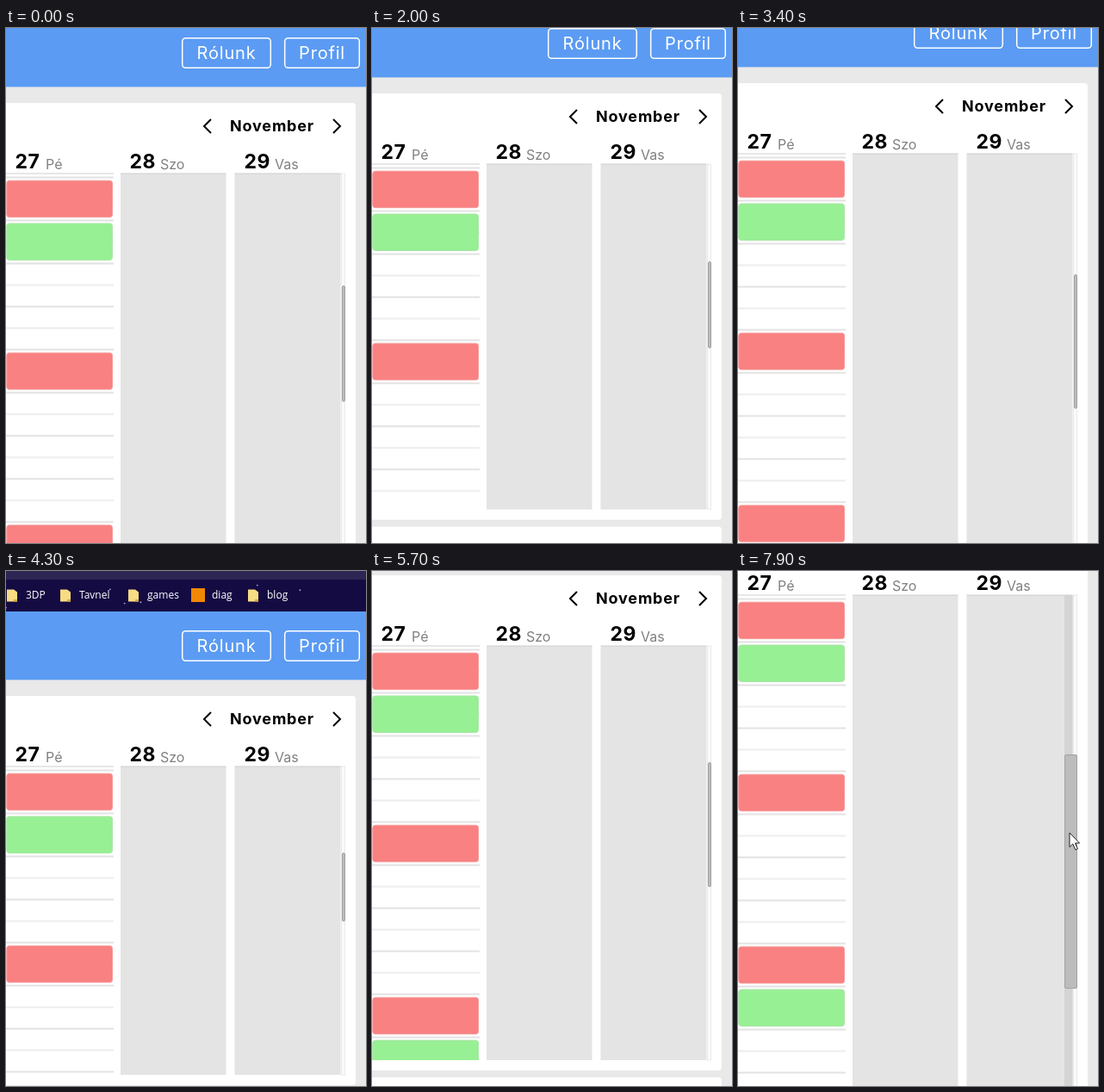
Write an HTML page that moves like this. It is 418x598 px and loops after 8000 ms.

```html
<!DOCTYPE html>
<html lang="hu">
<head>
<meta charset="utf-8">
<style>
  html, body { margin: 0; width: 100%; height: 100%; overflow: hidden; background: #e9e9e9; }
  svg { display: block; width: 418px; height: 598px; }
  text { font-family: Inter, sans-serif; }
  .button rect { fill: none; stroke: #fff; stroke-width: 1.5; }
  .button text { fill: #fff; font-size: 20px; letter-spacing: .8px; text-anchor: middle; }
  .month { font-size: 18px; font-weight: 700; letter-spacing: .8px; text-anchor: middle; }
  .arrow { fill: none; stroke: #000; stroke-width: 2; }
  .num { font-size: 23px; font-weight: 700; letter-spacing: .5px; }
  .day { font-size: 16px; fill: #808080; }
  .mark { font: 12px "Open Sans", sans-serif; fill: #fff; }
  .busy { fill: #f98181; stroke: #f79a9a; }
  .free { fill: #98f095; stroke: #a9e6a6; }
</style>
</head>
<body>
<svg viewBox="0 0 418 598">
  <defs>
    <clipPath id="clip"><rect class="fit" y="0" width="418"/></clipPath>
    <pattern id="rows" y="3.5" width="125" height="50" patternUnits="userSpaceOnUse">
      <rect width="125" height="2" fill="#e2e2e2"/>
      <rect y="25" width="125" height="2" fill="#ededed"/>
    </pattern>
  </defs>
  <rect width="418" height="598" fill="#e9e9e9"/>
  <!-- y = 0 is the top edge of the calendar grid -->
  <g id="page">
    <rect y="-330" width="418" height="80" fill="#160c3f"/>
    <rect y="-250" width="418" height="1" fill="#504a70"/>
    <rect y="-249" width="418" height="32" fill="#2d2554"/>
    <rect y="-217" width="418" height="37" fill="#150b43"/>
    <g id="stars" fill="#a9a2e0"></g>
    <g id="marks"></g>
    <rect y="-180" width="418" height="79.4" fill="#5b9bf3"/>
    <g class="button">
      <rect x="204.7" y="-157.3" width="102.6" height="34.6" rx="4"/>
      <text x="256" y="-133">Rólunk</text>
      <rect x="323.7" y="-157.3" width="86.6" height="34.6" rx="4"/>
      <text x="367" y="-133">Profil</text>
    </g>
    <rect id="card" x="-10" y="-82" width="416" rx="4" fill="#fff"/>
    <rect id="next" x="-10" width="416" height="600" rx="4" fill="#fff"/>
    <path class="arrow" d="M238-63l-8 8 8 8M380-63l8 8-8 8"/>
    <text class="month" x="309" y="-49">November</text>
    <g id="days"></g>
    <g clip-path="url(#clip)">
      <rect width="125" height="900" fill="url(#rows)"/>
      <g id="events"></g>
      <path d="M133 0h122.500v900h-122.500zM265.500 0h123v900h-123z" fill="#e4e4e4"/>
    </g>
    <path d="M0 0h125M133 0h122.500M265.500 0h123" stroke="#cfcfcf"/>
    <rect class="fit" x="389.500" width="4" fill="#fafafa" stroke="#e9e9e9"/>
    <rect id="track" class="fit" x="379" width="9.500" fill="#d4d4d4"/>
    <rect id="thumb" rx="1.500" fill="#bcbcbc" stroke="#a2a2a2"/>
    <path d="M401-303v20M397.500-299l3.500-4 3.500 4M397.500-286l3.500 4 3.500-4" fill="none" stroke="#fff" stroke-width="1.600"/>
  </g>
  <path id="pointer" d="M0 0v16.500l3.800-3.600 3 6.800 2.600-1.200-3-6.500h5.200z" fill="#fff" stroke="#222"/>
</svg>
<script>
  const $ = id => document.getElementById(id);
  const set = (el, attrs) => { for (const k in attrs) el.setAttribute(k, attrs[k]); };
  const fits = document.querySelectorAll('.fit');

  let seed = 7;
  const random = () => (seed = seed * 16807 % 2147483647) / 2147483647;
  for (let i = 0; i < 10; i++)
    $('stars').innerHTML += `<circle cx="${random() * 418}" cy="${-212 + random() * 30}" r=".9"/>`;

  const folder = x => `<path d="M${x}-205.500h8l4 3v11h-12z" fill="#f8dc83"/>
    <path d="M${x + 8}-194h4v2.500h-4z" fill="#d9a93c"/>`;
  const app = x => `<rect x="${x}" y="-207" width="16" height="16" fill="#f08705"/>`;
  const mark = (name, x, icon = folder) =>
    $('marks').innerHTML += icon(x - (icon === app ? 24 : 22)) + `<text class="mark" x="${x}" y="-195">${name}</text>`;
  mark('3DP', 23);
  mark('Tavnel', 85);
  mark('games', 164);
  mark('diag', 239, app);
  mark('blog', 303);

  ['Pé', 'Szo', 'Vas'].forEach((day, i) => {
    const x = 10.5 + 133 * i;
    $('days').innerHTML += `<text class="num" x="${x}" y="-6">${27 + i}</text>
      <text class="day" x="${x + 35.5}" y="-5">${day}</text>`;
  });

  const event = (kind, y) =>
    $('events').innerHTML += `<rect class="${kind}" x=".8" y="${y}" width="122.700" height="42.500" rx="3"/>`;
  for (let i = 0; i < 3; i++) {
    event('busy', 8.2 + 200 * i);
    if (i % 2 === 0) event('free', 58 + 200 * i);
  }

  // The dragged window edge moves the grid top: turning points as [time, y].
  const drag = [[-100, 157], [800, 268], [900, 297], [1100, 303], [1700, 199], [2000, 158], [2700, 95],
    [3200, 93], [3300, 134], [4100, 227], [4400, 227], [5400, 146], [5700, 87], [6200, 28], [8000, 28]];

  function gridTop(t) {
    const i = Math.max(1, drag.findIndex(p => p[0] > t));
    const [t0, a] = drag[i - 1], [t1, b] = drag[i];
    return a + (b - a) * Math.max(0, t - t0) / (t1 - t0);
  }

  // The layout follows the drag late, and later when growing than when shrinking.
  const gridHeight = t => Math.round(703 - 1.52 * Math.max(gridTop(t - 100), gridTop(t - 300)));

  const CONTENT = 1600, SCROLL = 449;

  function draw(now) {
    const t = Math.floor(now % 8000 / 100) * 100;
    const h = gridHeight(t);
    const rest = 1 - Math.max(0, t - 6900) / 1000;
    const away = Math.max(0, rest) ** 2;
    const hover = t >= 7500;
    set($('page'), { transform: `translate(0 ${Math.round(gridTop(t))})` });
    fits.forEach(el => set(el, { height: h }));
    set($('card'), { height: h + 94 });
    set($('next'), { y: h + 20 });
    set($('track'), { visibility: hover ? 'visible' : 'hidden' });
    set($('thumb'), {
      x: hover ? 379.5 : 390.5, width: hover ? 14 : 3,
      y: Math.round(SCROLL * h / CONTENT) + .5, height: Math.round(h * h / CONTENT) - 1
    });
    set($('pointer'), { transform: `translate(${385 + 10 * away} ${304 - 330 * away})` });
    requestAnimationFrame(draw);
  }
  draw(0);
</script>
</body>
</html>
```
